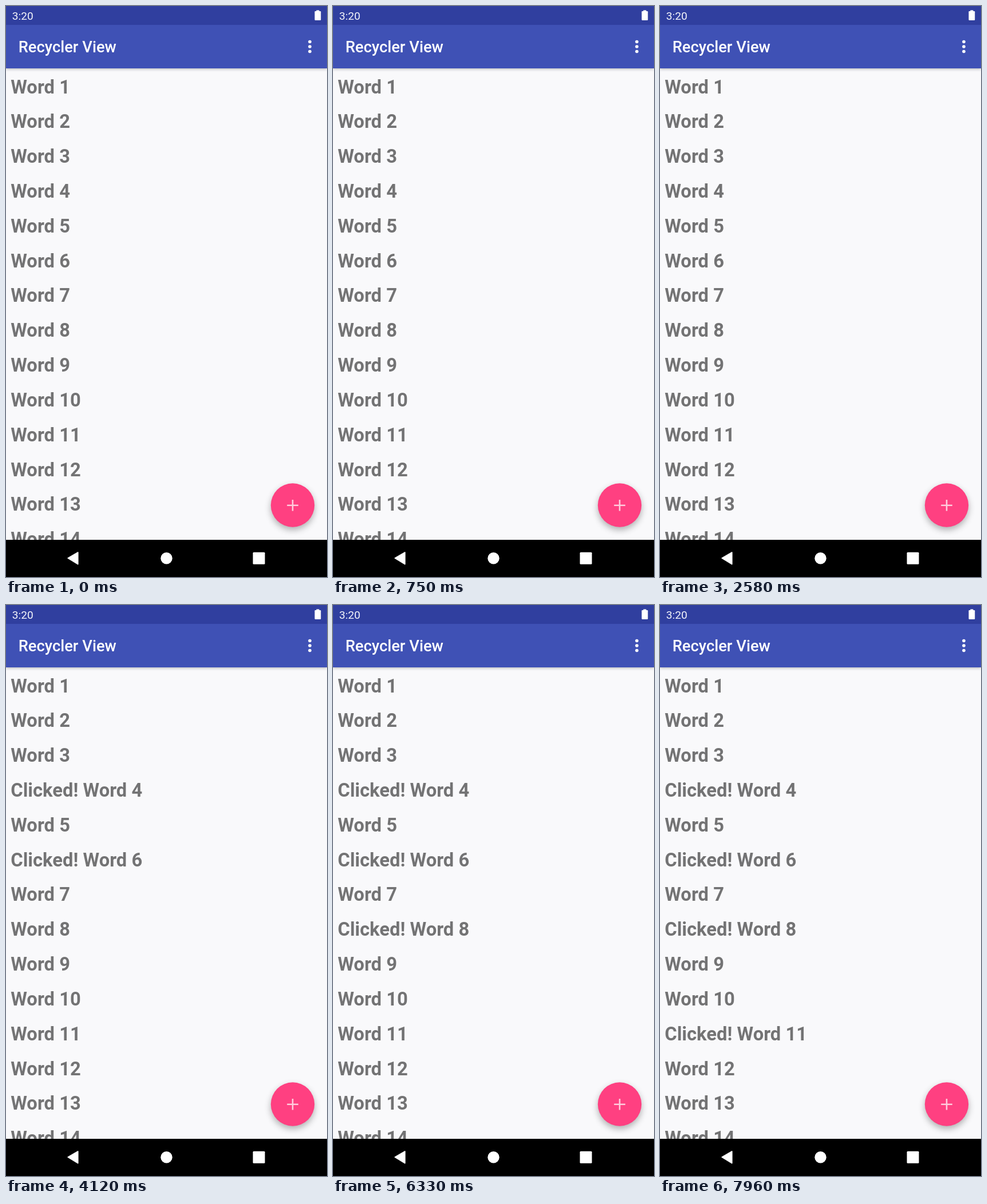
These frames come from a looping animation (561x998 px, 8000 ms). An HTML page with a canvas:

```html
<!DOCTYPE html>
<html lang="en">
<head>
<meta charset="utf-8">
<title>Word list</title>
<style>
  html, body { margin: 0; width: 100%; height: 100%; overflow: hidden; background: #f9f9fb; }
  canvas { display: block; width: 561px; height: 998px; }
</style>
</head>
<body>
<canvas id="stage" width="561" height="998"></canvas>
<script>
const ctx = document.getElementById('stage').getContext('2d');
const W = 561, H = 998, LOOP = 8000;
const BAR_TOP = 33, BAR_BOTTOM = 109, NAV_TOP = 933;
const ROW = { x: 8.2, y: 152.5, step: 60.83, count: 14 };

// Word number -> time in ms at which it is clicked
const clicks = { 4: 2800, 6: 3650, 8: 5040, 11: 6620 };

function rect(x, y, w, h, color) {
  ctx.fillStyle = color;
  ctx.fillRect(x, y, w, h);
}

function disc(x, y, r, color) {
  ctx.fillStyle = color;
  ctx.beginPath();
  ctx.arc(x, y, r, 0, Math.PI * 2);
  ctx.fill();
}

function roundBox(x, y, w, h, r, color) {
  ctx.fillStyle = color;
  ctx.beginPath();
  ctx.roundRect(x, y, w, h, r);
  ctx.fill();
}

function text(str, x, y, weight, size, color) {
  ctx.font = `${weight} ${size}px Roboto, sans-serif`;
  ctx.fillStyle = color;
  ctx.fillText(str, x, y);
}

function setShadow(alpha, blur, dy) {
  ctx.shadowColor = `rgba(0,0,0,${alpha})`;
  ctx.shadowBlur = blur;
  ctx.shadowOffsetY = dy;
}

function drawList(t) {
  for (let n = 1; n <= ROW.count; n++) {
    const label = (t >= clicks[n] ? 'Clicked! ' : '') + 'Word ' + n;
    text(label, ROW.x, ROW.y + (n - 1) * ROW.step, 700, 32.76, '#737374');
  }
}

function drawBars() {
  ctx.save();
  setShadow(0.26, 5, 1.5);
  rect(0, BAR_TOP, W, BAR_BOTTOM - BAR_TOP, '#3f51b5');
  ctx.restore();
  rect(0, 0, W, BAR_TOP, '#303f9f');
  text('3:20', 10.8, 24, 400, 19.1, '#f4f5fa');
  text('Recycler View', 21.8, 81.3, 500, 27.3, '#fff');
  roundBox(539.5, 9, 10.8, 16, 1.2, '#fff');
  rect(542.4, 7.4, 5, 2, '#fff');
  for (let i = -1; i <= 1; i++) disc(531, 71 + i * 8.5, 2.8, '#fff');
}

function drawAddButton() {
  ctx.save();
  setShadow(0.3, 12, 5);
  disc(501, 872.5, 38.2, '#ff4081');
  ctx.restore();
  ctx.strokeStyle = '#ffcbdc';
  ctx.lineWidth = 2.6;
  ctx.beginPath();
  ctx.moveTo(491.2, 872.8);
  ctx.lineTo(510.8, 872.8);
  ctx.moveTo(501, 863);
  ctx.lineTo(501, 882.6);
  ctx.stroke();
}

function drawNav() {
  rect(0, NAV_TOP, W, H - NAV_TOP, '#000');
  ctx.fillStyle = ctx.strokeStyle = '#fff';
  ctx.lineWidth = 2;
  ctx.lineJoin = 'round';
  ctx.beginPath();
  ctx.moveTo(108.4, 965);
  ctx.lineTo(125.6, 955);
  ctx.lineTo(125.6, 975.4);
  ctx.closePath();
  ctx.fill();
  ctx.stroke();
  disc(280.5, 965.2, 10.2, '#fff');
  roundBox(431.5, 954.8, 21, 21, 1.5, '#fff');
}

function frame(now) {
  rect(0, 0, W, H, '#f9f9fb');
  drawList(now % LOOP);
  drawBars();
  drawAddButton();
  drawNav();
}

const start = performance.now();
function tick() {
  frame(performance.now() - start);
  requestAnimationFrame(tick);
}
tick();
</script>
</body>
</html>
```
